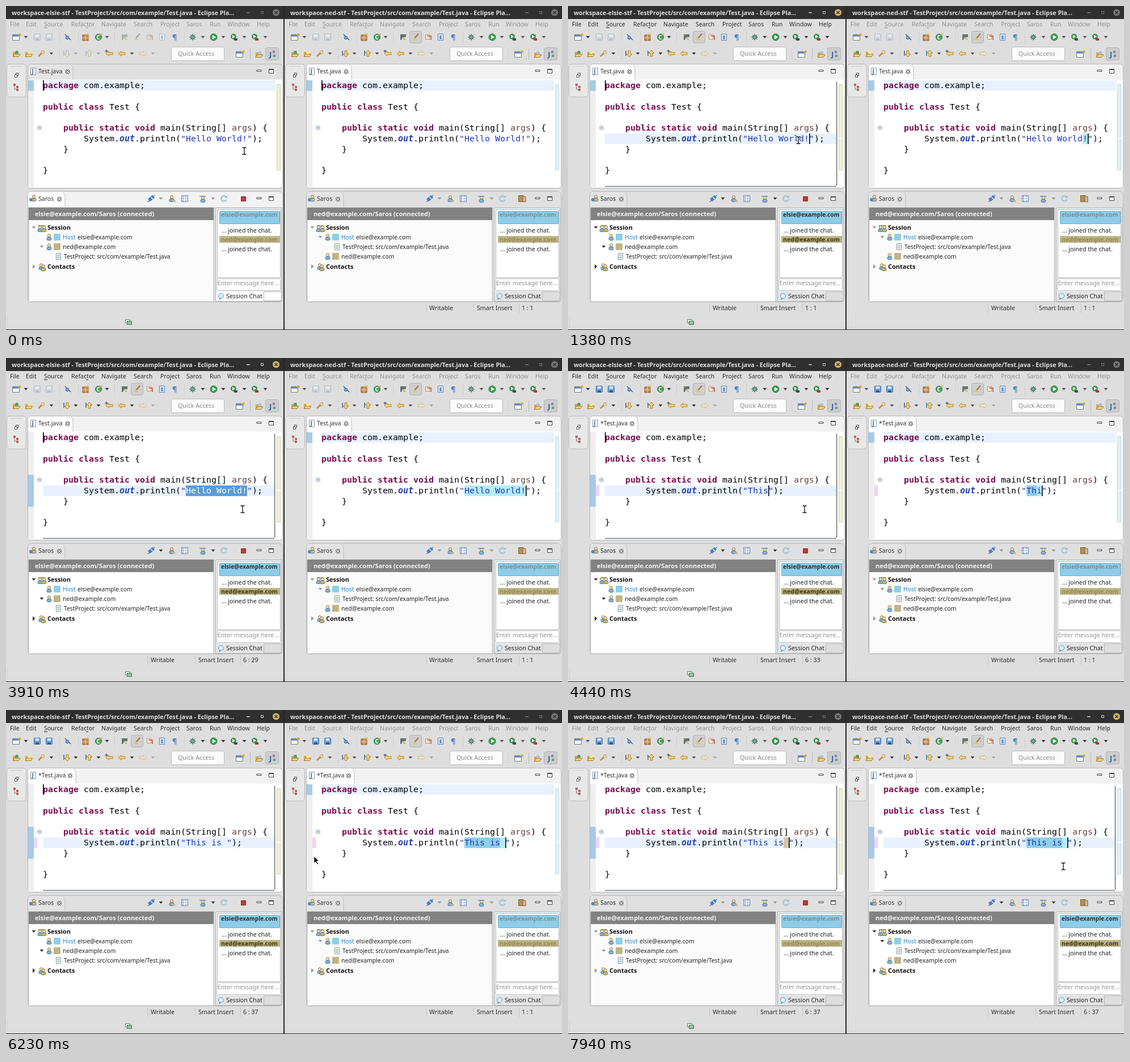
Animation, 980 px wide and 572 px high, one loop 7990 ms. Source, as an HTML page with a canvas:

```html
<!DOCTYPE html>
<html lang="en">
<head>
<meta charset="utf-8">
<title>Shared editing session</title>
<style>
html, body { margin: 0; width: 100%; height: 100%; overflow: hidden; background: #dedede; }
canvas { display: block; width: 980px; height: 572px; }
</style>
</head>
<body>
<canvas id="stage" width="980" height="572"></canvas>
<script>
const ctx = document.getElementById('stage').getContext('2d');
const LOOP = 7990, SECOND = 491;
const LEFT_CLICK = 1200, DRAG_START = 1420, DRAG_END = 2220, RIGHT_CLICK = 7060, LAG = 60;
const KEY_TIMES = [3990, 4110, 4250, 4400, 4730, 4850, 4980, 5380];
const COL = 9, ROW = 18.8, TEXT_X = 65, TEXT_Y = 131;
const START = 28, END = 40;

const sans = (size = 10.667, weight = '') => `${weight} ${size}px "Noto Sans", sans-serif`;
const mono = (style = '') => `${style} 14.95px "DejaVu Sans Mono", monospace`;
const colX = c => TEXT_X + c * COL;
const rowY = r => TEXT_Y + r * ROW;

function rect(x, y, w, h, fill, stroke, r = 0) {
  ctx.beginPath();
  ctx.roundRect(x, y, w, h, r);
  if (fill) { ctx.fillStyle = fill; ctx.fill(); }
  if (stroke) { ctx.strokeStyle = stroke; ctx.lineWidth = 1; ctx.stroke(); }
}
function dot(x, y, r, fill, stroke) {
  ctx.beginPath();
  ctx.arc(x, y, r, 0, 7);
  if (fill) { ctx.fillStyle = fill; ctx.fill(); }
  if (stroke) { ctx.strokeStyle = stroke; ctx.lineWidth = 1; ctx.stroke(); }
}
function path(points, fill, stroke, width = 1) {
  ctx.beginPath();
  points.forEach(([x, y]) => ctx.lineTo(x, y));
  if (fill) { ctx.closePath(); ctx.fillStyle = fill; ctx.fill(); }
  if (stroke) { ctx.strokeStyle = stroke; ctx.lineWidth = width; ctx.stroke(); }
}
function text(s, x, y, color, font = sans()) {
  ctx.font = font;
  ctx.fillStyle = color;
  ctx.fillText(s, x, y);
}
const at = (x, y, points) => points.map(([px, py]) => [x + px, y + py]);
const drop = (x, y, color) => path(at(x, y, [[-3.5, -2], [3.5, -2], [0, 2]]), color);
const grip = (x, y) => { for (let i = 0; i < 5; i++) rect(x, y - 8 + i * 4, 1, 1, '#a5a5a5'); };
const cross = (x, y) => {
  for (const [color, w] of [['#444', 3.6], ['#f4f4f4', 1.5]])
    for (const s of [1, -1]) path([[x - 3, y - 3 * s], [x + 3, y + 3 * s]], null, color, w);
};

// toolbar icons, centred on x, y
const icons = {
  create(x, y) {
    rect(x - 6.5, y - 4.5, 12, 10, '#f6f8fb', '#777b80');
    rect(x - 6, y - 4, 11, 3, '#5e91cc');
    path([[x + 3, y - 4], [x + 9, y - 4]], null, '#d9a520', 2);
    path([[x + 6, y - 7], [x + 6, y - 1]], null, '#d9a520', 2);
  },
  save(x, y, on) {
    rect(x - 5.5, y - 5.5, 11, 11, on ? '#6fa8e2' : '#d4dce5', on ? '#346cae' : '#b1bbc6', 1);
    rect(x - 3, y - 5, 6, 4, on ? '#e8f2fc' : '#eaeef2');
    rect(x - 3, y + 2, 6, 4, on ? '#2c5d9a' : '#b9c2cd');
  },
  pen(x, y) {
    path([[x - 5, y - 5], [x + 5, y + 5]], null, '#2d5d9c', 1.5);
    dot(x - 1, y + 1, 2.8, '#78a7d8', '#39689d');
  },
  grid(x, y) {
    rect(x - 5, y - 4, 10, 10, '#c38a52', '#8c572b');
    path([[x, y - 4], [x, y + 6]], null, '#f4d9b4');
    path([[x - 5, y + 1], [x + 5, y + 1]], null, '#f4d9b4');
    dot(x + 4, y - 5, 2, '#e4bd4a');
  },
  klass(x, y) {
    dot(x, y, 5.5, '#48a55b', '#24733c');
    text('C', x - 3.5, y + 4, '#fff', sans(10, 'bold'));
    dot(x + 5, y - 5, 2, '#e4bd4a');
  },
  search(x, y, on) {
    path(at(x, y, [[-5, -5], [5, -5], [5, 0], [-1, 0], [-3, 5], [-5, 5]]), on ? '#5c776e' : '#aab5b0');
    path([[x - 1, y], [x + 4, y + 5]], null, on ? '#e0a650' : '#ccbba1', 2);
  },
  marker(x, y, on) {
    if (on) rect(x - 10.5, y - 10.5, 21, 21, '#cfcfcf', '#b3b3b3', 3);
    path([[x + 5, y - 6], [x - 2, y + 2]], null, on ? '#ad7940' : '#a9a39a', 2.5);
    path([[x - 2, y + 1], [x - 6, y + 5], [x + 3, y + 5]], on ? '#ecc949' : '#d3cdb7');
  },
  block(x, y, on) {
    rect(x - 4.5, y - 4.5, 7, 8, on ? '#fff7dd' : '#e5e1d7', on ? '#c08c3c' : '#b9b3a8');
    path([[x - 2, y - 2], [x + 5, y - 2], [x + 5, y + 5]], null, on ? '#c14a45' : '#ad9c9a', 1.5);
  },
  column(x, y, on) {
    rect(x - 4.5, y - 5.5, 9, 11, '#e9f1fa', on ? '#5680b1' : '#aeb9c5');
    rect(x - 2, y - 3, 4, 7, on ? '#6c9bd0' : '#b9c6d4');
  },
  bug(x, y) {
    for (let i = 0; i < 4; i++) {
      const a = i * Math.PI / 4, dx = 6 * Math.cos(a), dy = 6 * Math.sin(a);
      path([[x - dx, y - dy], [x + dx, y + dy]], null, '#44636b');
    }
    dot(x, y, 3.5, '#74a986', '#315d54');
  },
  run(x, y) {
    dot(x, y, 6, '#3fa152', '#25783a');
    path(at(x, y, [[-2, -3.5], [4, 0], [-2, 3.5]]), '#fff');
  },
  tool(x, y, on) {
    dot(x - 1, y - 1, 5, '#359449');
    path(at(x, y, [[-3, -4], [2, -1], [-3, 2]]), '#fff');
    rect(x, y + 2, 6, 4, on ? '#b03631' : '#40484f');
  },
  folder(x, y, accent) {
    path(at(x, y, [[-6, -3], [-2, -3], [0, -1], [4, -1], [4, 5], [-6, 5]]), '#d6a648');
    path(at(x, y, [[-3, 1], [7, 1], [4, 5.5], [-6, 5.5]]), '#f3d482', '#a57a24');
    if (accent) dot(x + 1, y - 2, 3, accent);
  },
  torch(x, y) {
    path([[x - 5, y + 5], [x + 2, y - 2]], null, '#c79344', 3);
    path([[x, y - 3], [x + 4, y - 6], [x + 6, y - 2], [x + 2, y + 1]], '#f3dda0', '#b09357');
  },
  step(x, y, on, up) {
    const s = up ? -1 : 1;
    path(at(x, y, [[-1, -5 * s], [3, -5 * s], [3, s], [6, s], [1, 6 * s], [-4, s], [-1, s]]),
      on ? '#f3cf72' : '#e7e1d1', on ? '#b27c24' : '#bcb6a8');
    rect(x - 6, y - 5, 2, 9, on ? '#5d83b6' : '#b8c0c9');
  },
  arrow(x, y, dir, color = '#f4d27a', edge = '#bd842b') {
    const p = at(x, y, [[-6, 0], [-1, -4.5], [-1, -2], [6, -2], [6, 2], [-1, 2], [-1, 4.5], [-6, 0]]);
    path(p.map(([px, py]) => [x + (px - x) * dir, py]), color, edge);
  },
  plug(x, y) {
    path([[x - 6, y + 6], [x + 6, y - 6]], null, '#4f7395', 1.5);
    path([[x - 4, y + 3], [x + 4, y - 4]], null, '#3e83c3', 6);
    path([[x - 1, y - 3], [x + 3, y + 1]], null, '#d3e6f6', 1.5);
  },
  person(x, y, body = '#80b2df') {
    dot(x, y - 2.5, 2.7, '#f3dda9', '#967b4b');
    rect(x - 4, y + 0.5, 8, 5, body, '#4b79a8', 2);
  },
  list(x, y) {
    rect(x - 5.5, y - 5.5, 11, 11, '#f7faff', '#6281ab');
    for (let i = 0; i < 3; i++) {
      rect(x - 4, y - 4 + i * 3.3, 2, 2, '#638cc2');
      rect(x, y - 4 + i * 3.3, 4, 1, '#638cc2');
    }
  },
  sync(x, y) {
    ctx.strokeStyle = '#a9c2d4';
    ctx.lineWidth = 2.5;
    ctx.beginPath();
    ctx.arc(x, y, 4.7, 0.3, 5.6);
    ctx.stroke();
    path(at(x, y, [[1, -1], [6, -1], [6, -6]]), '#a9c2d4');
  }
};

const lines = [
  [0, 0, ['k', 'package'], ['', ' com.example;']],
  [2, 0, ['k', 'public class'], ['', ' Test {']],
  [4, 4, ['k', 'public static void'], ['', ' main(String[] '], ['a', 'args'], ['', ') {']],
  [6, 4, ['', '}']],
  [8, 0, ['', '}']]
];
const codeStyle = {
  '': ['#000', ''], k: ['#7a0c52', 'bold'], a: ['#6a3e3e', ''],
  s: ['#2337b5', ''], f: ['#2440bd', 'italic bold']
};
function codeLine(row, col, ...parts) {
  for (const [kind, s] of parts) {
    const [color, style] = codeStyle[kind];
    text(s, colX(col), rowY(row) + 14, color, mono(style));
    col += s.length;
  }
}
const mark = (row, from, to, color) => rect(colX(from), rowY(row), (to - from) * COL, ROW, color);
const caret = (row, col) => rect(colX(col), rowY(row), 1.6, ROW, '#000');

const moves = [
  [0, 420, 256], [500, 420, 256], [1020, 427, 236], [1180, 427, 236], [1380, 406, 237],
  [1970, 322, 240], [2220, 320, 242], [2400, 320, 242], [2730, 418, 267], [2920, 418, 267],
  [2960, 417, 267], [5970, 417, 267], [6730, 878, 234], [7060, 878, 234], [7530, 873, 276], [LOOP, 873, 276]
];
function mouse(t) {
  const i = Math.max(1, moves.findIndex(m => m[0] >= t));
  const [t0, x0, y0] = moves[i - 1], [t1, x1, y1] = moves[i];
  const p = (t - t0) / (t1 - t0), e = p * p * (3 - 2 * p);
  return [x0 + (x1 - x0) * e, y0 + (y1 - y0) * e];
}

// text, caret and selection of the person typing in the first window
function author(t) {
  const count = KEY_TIMES.filter(k => k <= t).length;
  const content = count ? 'This is '.slice(0, count) : 'Hello World!';
  const dragX = mouse(Math.min(t, DRAG_END))[0];
  let col = 0;
  if (count) col = START + count;
  else if (t >= DRAG_START) col = Math.min(END, Math.max(START, Math.round((dragX - TEXT_X) / COL)));
  else if (t >= LEFT_CLICK) col = END;
  const clicked = t >= LEFT_CLICK;
  return { count, content, col, row: clicked ? 5 : 0, selecting: clicked && !count && col < END };
}
function blinkOn(t) {
  const offs = [[2120, 2720], [3320, 3920], [6060, 6660]];
  return !offs.some(([a, b]) => t >= a && t < b);
}

function frame(name, active) {
  rect(0, 0, 489, 571, '#dedede');
  rect(0, 0, 489, 23, '#2f2f2f');
  text(`workspace-${name}-stf - TestProject/src/com/example/Test.java - Eclipse Pla...`, 10, 16, '#dedede', sans(10.667, 'bold'));
  const button = active ? '#cfcfcf' : '#777';
  rect(424, 11, 6, 1.5, button);
  rect(449.5, 9.5, 4, 4, null, button);
  dot(476, 11.5, 6, active ? '#d8b26a' : '#777');
  for (const s of [1, -1]) path([[473.5, 11.5 - 2.5 * s], [478.5, 11.5 + 2.5 * s]], null, '#2f2f2f', 1.4);

  const ink = active ? '#2d2d2d' : '#919191';
  const menu = { File: 7, Edit: 35, Source: 67, Refactor: 115, Navigate: 168, Search: 225, Project: 272, Saros: 318, Run: 359, Window: 390, Help: 442 };
  for (const label in menu) text(label, menu[label], 36, ink, sans(10.5));
  rect(67, 38, 6, 1, ink);
  rect(141, 38, 4, 1, ink);
}

function toolbar(active, editing, dirty) {
  const ink = active ? '#333' : '#555', off = '#aaa';
  [94, 127, 191, 314].forEach(x => grip(x, 55));
  icons.create(18, 55);
  icons.save(55, 55, dirty);
  icons.save(76, 55, dirty);
  icons.pen(109, 55);
  icons.grid(140, 55);
  icons.klass(163, 55);
  icons.search(209, 55, editing);
  icons.marker(231, 55, editing);
  icons.block(253, 55, editing);
  icons.column(275, 55, editing);
  text('¶', 293, 60, '#5181bb', sans(13, 'bold'));
  icons.bug(329, 55);
  icons.run(366, 55);
  icons.tool(402, 55, false);
  icons.tool(439, 55, true);
  [35, 178, 347, 383, 420, 457].forEach(x => drop(x, 55, ink));

  [94, 394].forEach(x => grip(x, 84));
  icons.folder(18, 84, '#4e9e62');
  icons.folder(40, 84, '#f3e6a4');
  icons.torch(62, 84);
  icons.step(107, 84, editing, false);
  icons.step(146, 84, editing, true);
  icons.arrow(182, 84, 1);
  text('*', 174, 85, '#375d94', sans(11, 'bold'));
  icons.arrow(204, 84, 1);
  icons.arrow(241, 84, -1, '#f4e7c4', '#cdb88c');
  [80, 222].forEach(x => drop(x, 84, ink));
  [123, 163].forEach(x => drop(x, 84, editing ? ink : off));
  drop(259, 84, off);
  rect(291.5, 72.5, 93, 24, '#fcfcfc', '#bababa', 3);
  text('Quick Access', 303, 88, '#898989');
  icons.create(412, 85);
  rect(430, 75, 1, 20, '#b9b9b9');
  icons.folder(446, 85, '#a6bfdf');
  rect(457.5, 73.5, 23, 22, '#cdcdcd', '#b2b2b2', 3);
  text('J', 464, 90, '#315f9e', sans(13, 'bold'));
  dot(472, 81, 2.3, '#9d6fae');
  dot(473, 88, 2.3, '#57a268');

  rect(1.5, 102.5, 34, 58, '#e8e8e8', '#b9b9b9', 5);
  for (let i = 0; i < 7; i++) rect(8 + i * 3, 106, 1, 1, '#999');
  rect(17.5, 118.5, 4, 4, '#fff', '#444');
  rect(15.5, 121.5, 4, 4, '#fff', '#444');
  path([[15, 139], [15, 147], [21, 147]], null, '#6b7991');
  [[15, 139], [20, 143], [20, 148]].forEach(([x, y]) => rect(x - 2, y - 2, 4, 4, '#c2605c'));
}

function panel(y, h, tabWidth, focused) {
  rect(38.5, y + 0.5, 449, h, focused ? '#f2f2f2' : '#e0e0e0', '#b7b7b7', 6);
  rect(39, y + 1, tabWidth, 27, focused ? '#fff' : '#e4e4e4', null, [5, 5, 0, 0]);
  path([[39 + tabWidth, y + 28], [39 + tabWidth, y + 7], [36 + tabWidth, y + 1]], null, '#bdbdbd');
  rect(442, y + 11, 8, 2.5, '#fff', '#444');
  rect(463.5, y + 9.5, 8, 7, '#fff', '#444');
  rect(463, y + 9, 9, 2, '#444');
}

function editor(w, a) {
  const label = w.dirty ? '*Test.java' : 'Test.java';
  panel(102, 219, w.dirty ? 84 : 79, w.editing);
  rect(43.5, 109.5, 9, 12, '#fff', '#8795a7');
  text('J', 45.5, 119, '#315f9e', sans(10, 'bold'));
  text(label, 57, 119, '#2d2d2d', sans(10.5));
  cross(w.dirty ? 113 : 108.5, 116);

  rect(39, 130, 448, 191, '#fff', null, [0, 0, 5, 5]);
  rect(39, 131, 10, 189, '#efefef');
  const [first, count] = w.range;
  rect(39, rowY(first), 10, count * ROW, '#a5cbe7');
  if (w.dirty) rect(49, rowY(5), 6.5, ROW, '#f3d3f2');
  rect(TEXT_X, rowY(w.line), 410, ROW, '#e8f2fe');
  w.marks.forEach(m => mark(...m));

  lines.forEach(l => codeLine(...l));
  codeLine(5, 8, ['', 'System.'], ['f', 'out'], ['', '.println('], ['s', `"${a.content}"`], ['', ');']);
  if (w.selection) {
    const [from, to] = w.selection;
    mark(5, from, to, '#5b9bd5');
    text(a.content.slice(from - START, to - START), colX(from), rowY(5) + 14, '#fff', mono());
  }
  w.carets.forEach(c => caret(...c));

  dot(59, 215, 3.5, '#f2f6fa', '#91a4b9');
  rect(57, 214.5, 4, 1, '#556f8c');
  rect(477.5, 138.5, 6, 151, w.ruler, w.rulerEdge);
  if (w.line === 5 || w.marks.length) rect(477, 233, 8, 1.5, '#fff');
  if (w.bars) {
    rect(472.5, 134, 2.2, 183, '#93979b');
    rect(TEXT_X, 317.5, 408, 2, '#93979b');
  }
}

function personRow(x, y, color, name, host) {
  icons.person(x, y);
  rect(x + 8, y - 6, 12, 12, color, null, 1);
  if (host) text('Host', x + 24, y + 4, '#2b82c4', sans(10.4));
  text(name, x + (host ? 50 : 24), y + 4, '#222', sans(10.4));
}
function fileRow(x, y) {
  rect(x - 13.5, y - 5.5, 8, 11, '#fff', '#8795a7');
  for (let i = 0; i < 3; i++) rect(x - 12, y - 3 + i * 2.5, 5, 1, '#73a17e');
  text('TestProject: src/com/example/Test.java', x, y + 4, '#222', sans(10.3));
}

function saros(w) {
  const { active, first } = w, ink = active ? '#333' : '#999', focused = !w.editing;
  panel(327, 195, 65, focused);
  icons.person(49, 339, '#ebb44f');
  dot(44, 342, 3, '#4b8bc6');
  text('Saros', 57, 344, '#2d2d2d', sans(10.5));
  cross(94, 341);
  icons.plug(256, 340);
  icons.person(292, 340);
  rect(294, 343, 5, 3, '#e2b747');
  icons.list(315, 340);
  icons.person(347, 341);
  path([[341, 336], [352, 336]], null, '#6f8ca9', 1.5);
  icons.sync(384, 340);
  [273, 365].forEach(x => drop(x, 340, ink));
  if (first) rect(414.5, 336.5, 8, 8, '#c83737', '#952525');
  else {
    rect(412.5, 334.5, 8, 11, '#b78d5d', '#80603d');
    path([[420, 335], [425, 337], [425, 346], [420, 345]], '#d9ba8f', '#80603d');
  }

  rect(39, 355, 448, 166, '#dedede', null, [0, 0, 4, 4]);
  rect(40, 356, 326, 166, active ? '#fff' : '#fbfbfb', '#b9b9b9');
  rect(40, 356, 326, 22, '#828282');
  text(`${w.name}@example.com/Saros (connected)`, 51, 371, '#f3f3f3', sans(11, 'bold'));
  const fold = active ? '#333' : '#999';
  drop(49, 391, fold);
  rect(57.5, 387.5, 11, 3, '#dae6f2', '#597aa0');
  icons.person(60, 393);
  icons.person(67, 393, '#e0b551');
  text('Session', 73, 395, '#111', sans(11, 'bold'));
  const host = 'elsie@example.com', guest = 'ned@example.com';
  personRow(76, 408, '#8fcfe8', host, true);
  personRow(76, first ? 425 : 442, '#bdb583', guest, false);
  drop(63, first ? 425 : 408, fold);
  fileRow(102, first ? 442 : 425);
  path(at(49, 460, [[-2, -4], [2.5, 0], [-2, 4]]), fold);
  icons.person(62, 460);
  icons.person(66, 462, '#e0b551');
  text('Contacts', 73, 464, '#111', sans(11, 'bold'));

  rect(369.5, 356.5, 116, 165, '#f0f0f0', '#b4b4b4');
  rect(372.5, 359.5, 111, 120, '#fff', '#b9b9b9');
  rect(376.5, 362.5, 106, 22, '#8dcde8', '#64afd1', 1);
  rect(376, 406, 107, 12, '#bdb583');
  text(host, 379, 372, active ? '#213038' : '#7292a0', sans(10.1, 'bold'));
  text(guest, 379, 416, active ? '#35311c' : '#91895e', sans(10.6, 'bold'));
  text('... joined the chat.', 380, 400, '#222');
  text('... joined the chat.', 380, 433, '#222');
  rect(371.5, 481.5, 112, 21, '#fff', '#bcbcbc', 2);
  text('Enter message here...', 372.5, 493, '#929292');
  rect(370, 504, 84, 17, focused ? '#fff' : '#e4e4e4');
  rect(454.5, 504.5, 31, 16, focused ? '#fff' : '#dedede', '#b5b5b5');
  dot(379, 512, 4.5, '#dceefa', '#4d9bcf');
  path([[376, 515], [375, 519], [380, 516]], '#4d9bcf');
  text('Session Chat', 388, 516, '#222');
}

function statusBar(w) {
  for (let i = 0; i < 5; i++) rect(2, 550 + i * 4, 1, 1, '#aaa');
  if (w.first) {
    rect(210.5, 553.5, 8, 6, '#e4f1e4', '#4f8d61');
    rect(213.5, 556.5, 8, 6, '#90c69c', '#3b7950');
  }
  if (!w.editing) return;
  [249, 333, 413].forEach(x => rect(x, 525, 1, 17, '#c5c5c5'));
  text('Writable', 255, 537, '#2d2d2d');
  text('Smart Insert', 339, 537, '#2d2d2d');
  text(w.position, 418, 537, '#2d2d2d');
}

function drawWindow(x, w, a) {
  ctx.save();
  ctx.translate(x, 0);
  ctx.beginPath();
  ctx.rect(0, 0, 489, 572);
  ctx.clip();
  frame(w.name, w.active);
  toolbar(w.active, w.editing, w.dirty);
  editor(w, a);
  saros(w);
  statusBar(w);
  ctx.restore();
}

function pointer([x, y]) {
  if (x > 476 && x < 547) {
    path(at(x, y, [[0, 0], [0, 13], [3, 10], [6, 15], [8, 14], [5, 9], [9, 9]]), '#111', '#fff');
    return;
  }
  for (const [color, width] of [['#fff', 3], ['#111', 1.3]]) {
    path([[x, y - 5], [x, y + 5]], null, color, width);
    for (const s of [-1, 1])
      path(at(x, y, [[-3.5, 6 * s], [-1, 6 * s], [0, 5 * s], [1, 6 * s], [3.5, 6 * s]]), null, color, width);
  }
}

function draw(t) {
  const own = author(t), remote = author(t - LAG);
  const joined = t >= RIGHT_CLICK, begun = t >= LEFT_CLICK;
  const leftCarets = [joined ? [5, own.col] : [0, 0]];
  if (begun && !joined && blinkOn(t)) leftCarets.push([own.row, own.col]);

  const remoteMarks = [];
  if (remote.count) remoteMarks.push([5, START, remote.col, '#8fcfe8']);
  if (remote.row) remoteMarks.push([5, remote.selecting ? remote.col : remote.col - 1,
    remote.selecting ? END : remote.col, '#b3ecfb']);

  ctx.fillStyle = '#252525';
  ctx.fillRect(0, 0, 980, 572);
  drawWindow(0, {
    name: 'elsie', first: true, active: begun && !joined, editing: begun, dirty: own.count > 0,
    line: begun ? 5 : 0, range: t < 2600 ? [0, 1] : [4, 3], bars: t >= 520,
    marks: joined ? [[5, own.col - 1, own.col, '#d5c8a8']] : [],
    selection: own.selecting ? [own.col, END] : null, carets: leftCarets,
    position: t < DRAG_START ? '1 : 1' : `6 : ${own.col + 1}`, ruler: '#f0f0d8', rulerEdge: '#d2d0ae'
  }, own);
  drawWindow(SECOND, {
    name: 'ned', first: false, active: joined, editing: true, dirty: remote.count > 0,
    line: joined ? 5 : 0, range: t < 7900 ? [0, 1] : [4, 3], bars: t >= 6500,
    marks: remoteMarks, selection: null,
    carets: [[remote.row, remote.selecting ? END : remote.col]],
    position: joined ? '6 : 37' : '1 : 1', ruler: '#e0f2fb', rulerEdge: '#b3d9eb'
  }, remote);
  pointer(mouse(t));
}

function tick() {
  draw(performance.now() % LOOP);
  requestAnimationFrame(tick);
}
tick();
</script>
</body>
</html>
```
